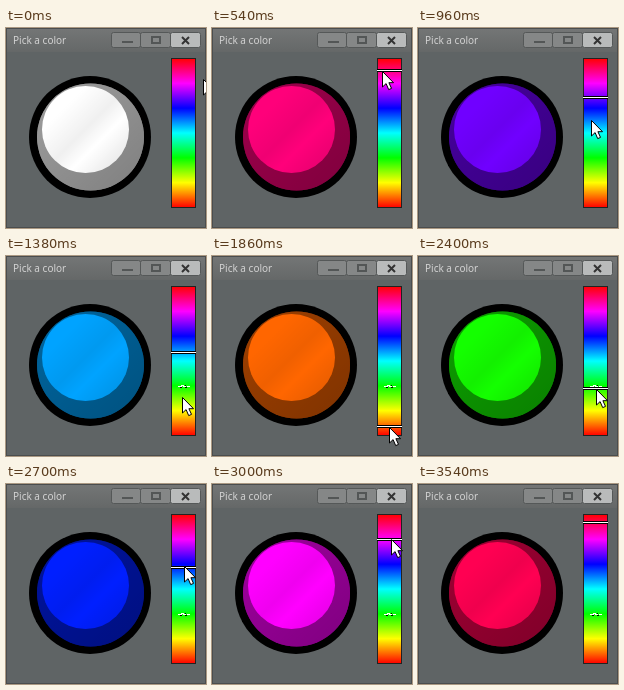
Write an HTML page that moves like this. It is 200x200 px and loops after 3.84 s.

```html
<!DOCTYPE html>
<html lang="en">
<head>
<meta charset="utf-8">
<title>Pick a color</title>
<style>
  html, body { margin: 0; width: 100%; height: 100%; overflow: hidden; background: #5f6465; }
  svg { display: block; width: 100vw; height: 100vh; }
  text { font: 10px "Noto Sans", "Open Sans", sans-serif; fill: #d2d2d2; }
</style>
</head>
<body>
<svg viewBox="0 0 200 200">
  <defs>
    <linearGradient id="bar" x2="0" y2="1">
      <stop stop-color="#747676"/><stop offset="1" stop-color="#656868"/>
    </linearGradient>
    <linearGradient id="hues" x2="0" y2="1">
      <stop stop-color="#f00"/><stop offset=".1667" stop-color="#f0f"/>
      <stop offset=".3333" stop-color="#00f"/><stop offset=".5" stop-color="#0ff"/>
      <stop offset=".6667" stop-color="#0f0"/><stop offset=".8333" stop-color="#ff0"/>
      <stop offset="1" stop-color="#f00"/>
    </linearGradient>
    <linearGradient id="shade" x2="1" y2="1">
      <stop stop-opacity=".38"/><stop offset="1" stop-opacity=".5"/>
    </linearGradient>
    <linearGradient id="gloss" x2="1" y2="1">
      <stop offset=".25" stop-opacity="0"/><stop offset=".5" stop-opacity=".06"/>
      <stop offset=".65" stop-opacity="0"/><stop offset=".9" stop-opacity=".09"/>
    </linearGradient>
  </defs>

  <rect width="200" height="200" fill="#5f6465"/>
  <rect width="200" height="24" fill="url(#bar)"/>
  <rect x=".5" y=".5" width="199" height="199" fill="none" stroke="#4a4d4e"/>
  <text x="7" y="16">Pick a color</text>

  <g stroke="#555858">
    <rect x="105.5" y="4.5" width="29" height="15" rx="2" fill="#858787"/>
    <rect x="134.5" y="4.5" width="30" height="15" rx="2" fill="#858787"/>
    <rect x="164.5" y="4.5" width="30" height="15" rx="2" fill="#b9bbbb"/>
  </g>
  <g fill="none" stroke="#535656" stroke-width="2">
    <path d="M116 14h11M146 9h8v6h-8z"/>
    <path d="M176 9l7 7M183 9l-7 7" stroke="#333"/>
  </g>

  <circle cx="84" cy="109" r="61"/>
  <g class="tint">
    <circle cx="84.5" cy="109" r="53.5"/>
  </g>
  <circle cx="84.5" cy="109" r="53.5" fill="url(#shade)"/>
  <g class="tint">
    <circle cx="79.5" cy="101.5" r="43.5"/>
  </g>
  <circle cx="79.5" cy="101.5" r="43.5" fill="url(#gloss)"/>

  <rect x="165.5" y="30.5" width="24" height="149" fill="url(#hues)" stroke="#222"/>
  <g id="trace" shape-rendering="crispEdges">
    <path d="M172 130.5h4m1 0h3m1 0h3M175 129.5h3" stroke="#fff"/>
    <path d="M174 131.5h2m3 0h2M179 129.5h1" stroke="#000"/>
  </g>
  <g id="marker" shape-rendering="crispEdges">
    <path d="M165 -1h25v3h-25z"/>
    <path d="M165 0h25v1h-25z" fill="#fff"/>
  </g>
  <path id="cursor" d="M.5 .5v15.5l3.6-3.4 2.6 6 2.8-1.2-2.6-5.7h4.6z" fill="#fff" stroke="#000"/>
</svg>
<script>
  const LOOP = 3840, TICK = 60, PICKED = 540, TRACE = 1200;

  // Keys: [time, x, y] for the pointer and [time, y] for the marker.
  const pointerKeys = [
    [0, 197, 51], [300, 170, 43], [540, 170, 43], [1380, 176, 141],
    [1560, 176, 162], [1860, 177, 171], [2160, 177, 171], [2400, 178, 133],
    [2700, 178, 82], [3180, 180, 39], [3420, 180, 39], [3480, 186, 39], [3540, 210, 39]
  ];
  const markerKeys = [
    [540, 42], [1380, 96], [1860, 170], [2160, 170], [2400, 132], [2700, 83], [3180, 38]
  ];

  const $ = id => document.getElementById(id);
  const tints = document.querySelectorAll(".tint");

  function sample(keys, t) {
    const i = keys.findIndex(key => key[0] > t);
    if (i < 0) return keys.at(-1).slice(1);
    if (i === 0) return keys[0].slice(1);
    const a = keys[i - 1], b = keys[i];
    const k = (t - a[0]) / (b[0] - a[0]);
    return a.slice(1).map((v, n) => Math.round(v + (b[n + 1] - v) * k));
  }

  const show = (el, on) => el.setAttribute("visibility", on ? "visible" : "hidden");

  function draw(now) {
    const t = Math.floor(now % LOOP / TICK) * TICK;
    const picked = t >= PICKED;
    const [x, y] = sample(pointerKeys, t);
    const [markerY] = sample(markerKeys, t);
    const hue = (180 - markerY) / 150 * 360;

    $("cursor").setAttribute("transform", `translate(${x} ${y})`);
    $("marker").setAttribute("transform", `translate(0 ${markerY})`);
    show($("marker"), picked);
    show($("trace"), t >= TRACE);
    tints.forEach(el => el.setAttribute("fill", picked ? `hsl(${hue}, 100%, 50%)` : "#fff"));
  }

  function frame() {
    draw(performance.now());
    requestAnimationFrame(frame);
  }
  frame();
</script>
</body>
</html>
```
